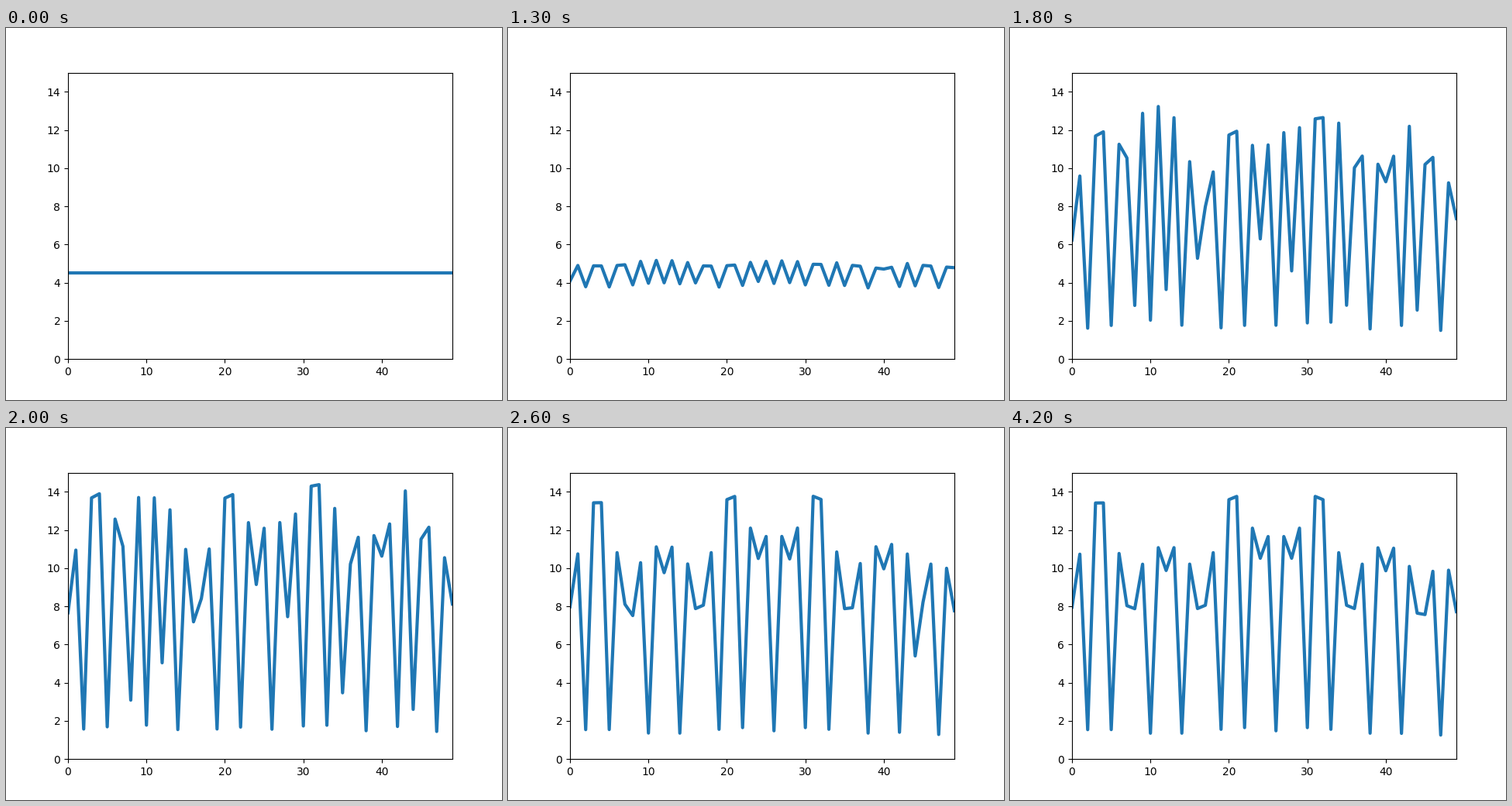
Write a matplotlib script that moves like this. It is 640 by 480 pixels and loops after 6220 ms.

```python
import numpy as np
import matplotlib.pyplot as plt
from matplotlib.animation import FuncAnimation

LOOP, TICK, STEP = 6220, 20, 100      # ms
START, ONSET = 700, 1300              # first movement, first clear ripple
CELLS = 50

# Lateral inhibition on a ring: active cells raise the level around them
# and lower their own.
WINNERS = [2, 5, 10, 14, 19, 22, 26, 30, 33, 38, 42, 47]
# Cells that start to win but are pushed back, with the time they give way
LOSERS = {0: 1550, 8: 2120, 12: 1960, 16: 1650, 24: 1670,
          28: 1800, 35: 2030, 44: 2400}
REST_ACTIVITY = 0.3275
GROWTH = 0.005                        # per ms
LOSER_CAP, FADE = 0.5, 120

cells = np.arange(CELLS)
gap = np.abs(cells[:, None] - cells)
gap = np.minimum(gap, CELLS - gap)
spread = np.where(gap > 0, 10.25 / np.cosh(0.7 * gap), 0)

losers = list(LOSERS)
give_way = np.array(list(LOSERS.values()))
bias = np.full(CELLS, -0.25)
bias[WINNERS + losers] = 0.25


def sigmoid(x):
    return 1 / (1 + np.exp(-x))


def activity(t):
    if t < START:
        return np.full(CELLS, REST_ACTIVITY)
    rest = np.log(REST_ACTIVITY / (1 - REST_ACTIVITY))
    growth = np.exp(GROWTH * min(t - ONSET, 1000))
    act = sigmoid(rest + bias * growth)
    act[losers] = (np.minimum(act[losers], LOSER_CAP)
                   * sigmoid((give_way - t) / FADE))
    return act


def levels(t):
    act = activity(t)
    return spread @ act / (1 + 5.5 * act) + 1.05 * act


fig, ax = plt.subplots(figsize=(6.4, 4.8), dpi=100)
line, = ax.plot(cells, levels(0), lw=3)
ax.set_xlim(0, CELLS - 1)
ax.set_ylim(0, 15)


def update(i):
    line.set_ydata(levels(i * TICK // STEP * STEP))
    return line,


anim = FuncAnimation(fig, update, frames=LOOP // TICK, interval=TICK,
                     repeat=True, repeat_delay=0, blit=False)
plt.show()
```
